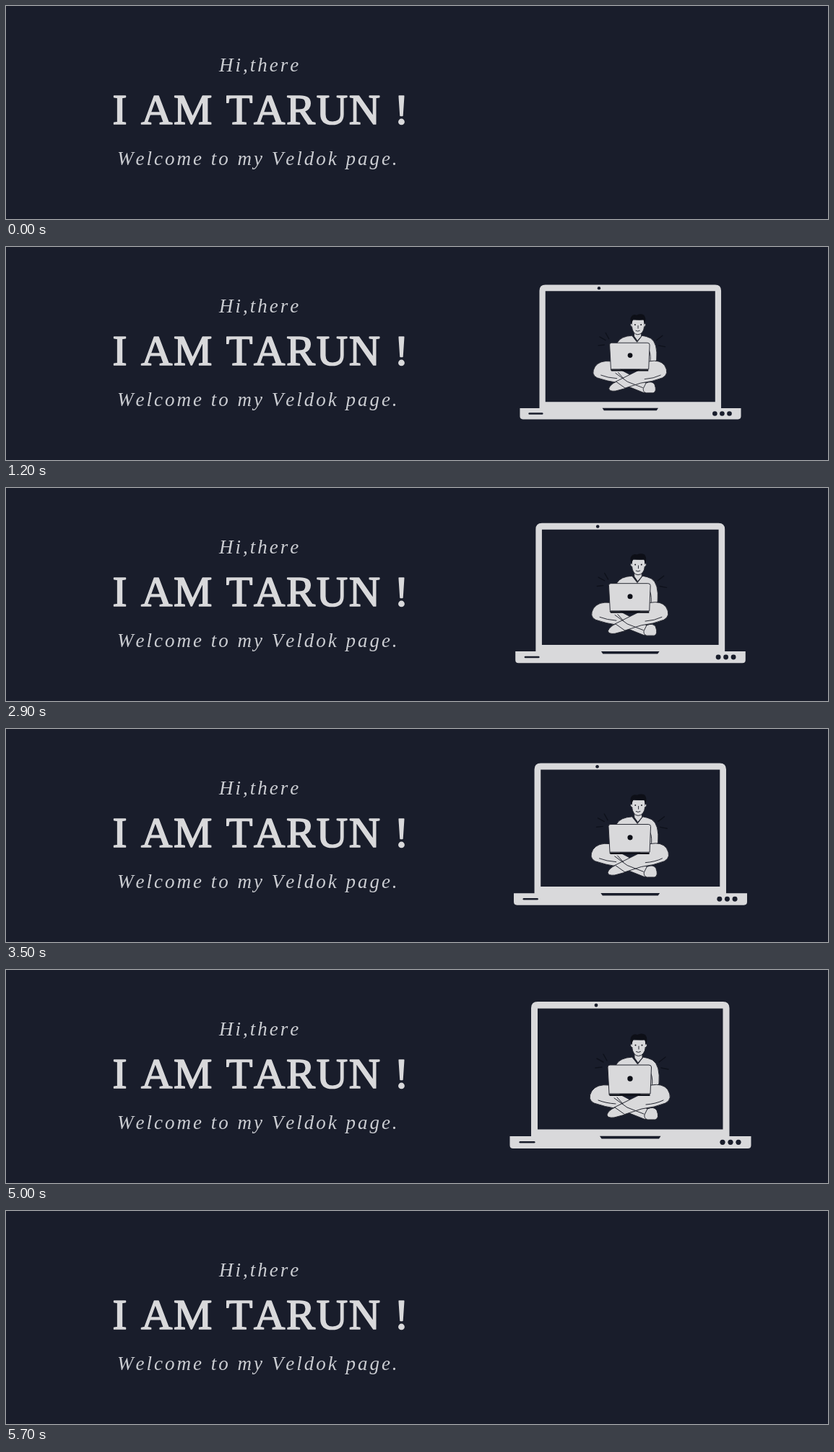
An HTML page that plays this animation: 1138 by 296 pixels, repeating every 6000 ms.

```html
<!DOCTYPE html>
<html lang="en">
<head>
<meta charset="utf-8">
<title>Welcome banner</title>
<style>
  html, body { margin: 0; height: 100%; overflow: hidden; background: #191d2b; }
  svg { display: block; width: 1138px; height: 296px; }
  text { font-family: "Liberation Serif", "Times New Roman", serif; font-kerning: none; }
  .small { font-size: 27px; font-style: italic; letter-spacing: 3px; fill: #cbcdd2; }
  .big { font-size: 60px; letter-spacing: 1.7px; word-spacing: 1px; fill: #d9d9db; stroke: #d9d9db; stroke-width: 1.7; stroke-linejoin: round; }
  .light { fill: #d9d9db; }
  .dark { fill: #191d2b; }
  .skin { fill: #d9d9db; stroke: #23252f; stroke-width: 1; stroke-linejoin: round; }
  .line { fill: none; stroke: #23252f; stroke-width: 1; stroke-linecap: round; }
  .hair { fill: #0d0f17; }
  .spark { fill: none; stroke: #0e111b; stroke-width: 1.5; stroke-linecap: round; }
</style>
</head>
<body>
<svg viewBox="0 0 1138 296">
  <text class="small" x="295" y="91">Hi,there</text>
  <text class="big" x="147.500" y="163.500">I AM TARUN !</text>
  <text class="small" x="154" y="221">Welcome to my Veldok page.</text>

  <g id="scene">
    <g id="computer">
      <path class="light" fill-rule="evenodd" d="M727 231V53q0-9 9-9H992.500q9 0 9 9V231H1031.500V243.500q0 4.500-4.500 4.500H702q-4.500 0-4.500-4.500V231z M736 53.500V221.500H992.500V53.500z"/>
      <circle class="dark" cx="817" cy="49" r="2.400"/>
      <path class="dark" d="M822 230.800H906.500L904 234.500H824.500z"/>
      <rect class="dark" x="710.500" y="238" width="22" height="2.600" rx="1.300"/>
      <circle class="dark" cx="992" cy="239.300" r="3.600"/>
      <circle class="dark" cx="1003" cy="239.300" r="3.600"/>
      <circle class="dark" cx="1014" cy="239.300" r="3.600"/>
    </g>

    <g id="person">
      <path class="spark" d="M827 117l5 9M818 123l9 5M816 136l9-1M904 128l9-7M907 136l10 2"/>
      <!-- torso and arms -->
      <path class="skin" d="M867 121Q850 122 845 131L840 150V172H894L904 158Q906 132 895 125Q889 122 882 121L874.500 130z"/>
      <path class="line" d="M893 144Q896 152 894 164M867 121L874.500 131L882 121"/>
      <!-- head -->
      <path class="skin" d="M870 113V122L875 129L881 122V113z"/>
      <path class="skin" d="M866.500 97V107Q868 119 875.500 119.500Q884 119 885.500 107V97z"/>
      <path class="skin" d="M866.500 103q-3-1-2 2t3 3M885.500 103q3-1 2 2t-3 3"/>
      <path class="hair" d="M866 103Q863 96 866 92Q869 88 874 90Q880 87 885 90Q889 95 886 103L884 97Q875 98 869 96z"/>
      <path class="line" d="M876 106v4M872.500 113.500q3 2 6 0"/>
      <circle class="hair" cx="871.500" cy="104.500" r="1"/>
      <circle class="hair" cx="880.500" cy="104.500" r="1"/>
      <!-- crossed legs -->
      <path class="skin" d="M835 160Q818 158 811 168Q804 180 814 185Q828 190 848 193L883 207Q893 210 896 203L890 194L852 174z"/>
      <path class="skin" d="M893 160Q909 157 916 166Q924 179 913 185Q898 191 880 193L846 204Q833 207 832 201L838 193L876 174z"/>
      <path class="skin" d="M888 193Q897 189 901 195Q905 206 899 208H888Q883 206 884 201z"/>
      <path class="skin" d="M843 191Q834 195 832 201Q832 206 842 205L857 201z"/>
      <path class="line" d="M842 178L860 191L883 200M820 181Q830 185 844 186M910 181Q900 186 886 187M846 177l8 9"/>
      <!-- notebook -->
      <path class="skin" d="M836 132H890Q893.500 132 893.500 135L892 172H835L833 135Q833 132 836 132z"/>
      <path class="hair" d="M834 172.500H891.500V175H836z"/>
      <circle class="hair" cx="864" cy="151" r="3.700"/>
    </g>
  </g>
</svg>
<script>
const [scene, computer, person] = ["scene", "computer", "person"].map(id => document.getElementById(id));
const LOOP = 6000, STEP = 100, CX = 864.5, CY = 146.3;
const clamp = v => Math.max(0, Math.min(1, v));

// Fade in from `start`, fade out until `end`
const fade = (t, start, end) => clamp((t - start) / 500) * clamp((end - t) / 500);

function draw(now) {
  const t = Math.floor(now % LOOP / STEP) * STEP;
  const zoom = 0.89 + 0.000022 * t;
  scene.setAttribute("transform", `translate(${CX} ${CY}) scale(${zoom}) translate(${-CX} ${-CY})`);
  computer.setAttribute("opacity", fade(t, 0, 5600));
  person.setAttribute("opacity", fade(t, 100, 5700));
  requestAnimationFrame(draw);
}
draw(performance.now());
</script>
</body>
</html>
```
